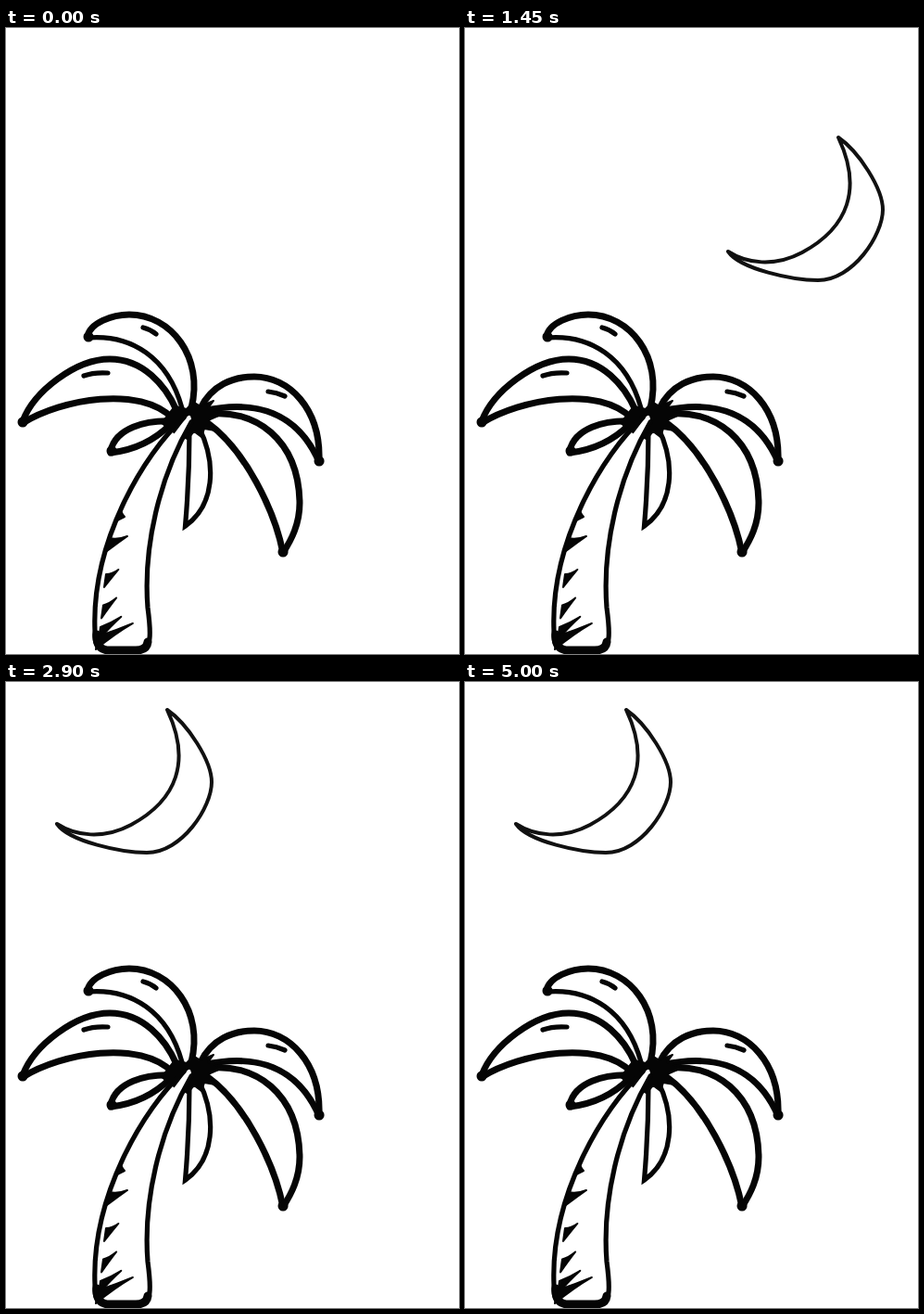
An HTML page that plays this animation: 489x675 px, repeating every 5.05 s.

```html
<!DOCTYPE html>
<html lang="en">
<head>
<meta charset="utf-8">
<title>Palm and moon</title>
<style>
  html, body { margin: 0; width: 100%; height: 100%; overflow: hidden; background: #fff; }
  svg { display: block; width: 100%; height: 100%; }
  path { fill: none; stroke: #050505; stroke-width: 7; stroke-linecap: round; stroke-linejoin: round; }
  .thin { stroke-width: 5.2; }
  .tips { stroke-width: 11; }
  .solid { fill: #050505; stroke-width: 2; }
  .white { fill: #fff; stroke: none; }
  #moon path { stroke-width: 4; stroke: #111; }
  #moon { animation: drift 5050ms infinite; }

  /* The moon glides in slowly, then swings up to its resting place, in 50 ms steps. */
  @keyframes drift {
    0%      { transform: translate(440px, 216px); animation-timing-function: steps(14); }
    13.861% { transform: translate(308px, 137px); animation-timing-function: steps(15); }
    28.713% { transform: translate(229px, 88px);  animation-timing-function: steps(5); }
    33.663% { transform: translate(205px, 74px);  animation-timing-function: steps(10); }
    43.564% { transform: translate(84px, 18px);   animation-timing-function: steps(4); }
    47.525% { transform: translate(38px, 8.5px);  animation-timing-function: cubic-bezier(.2, .6, .5, 1); }
    53.465%, 100% { transform: none; }
  }
</style>
</head>
<body>
<svg viewBox="0 0 489 675">
  <g id="leaves">
    <path d="M88 333C90 318 115 309 133 309C178 309 214 355 200 410"/>
    <path class="thin" d="M88 334C135 330 175 355 190 410"/>
    <path d="M18 424C30 392 75 357 112 357C148 357 172 385 184 412"/>
    <path d="M18 426C60 400 145 385 180 421"/>
    <path d="M113 456C118 432 150 422 182 424"/>
    <path d="M113 458C140 455 160 445 178 427"/>
    <path d="M210 410C222 385 245 376 268 376C305 376 340 410 338 467"/>
    <path d="M338 468C315 415 270 400 213 413"/>
    <path d="M213 417C270 408 316 445 317 512C317 535 308 552 299 566"/>
    <path d="M299 566C290 520 258 455 218 426"/>
    <path class="thin" style="stroke-linejoin:miter" d="M208 430C228 470 225 515 193.500 537Q198 485 198 434"/>
    <path class="tips" d="M18 425h.1M338 467h.1M299 565h.1M114 456h.1M89 333h.1"/>
    <path class="thin" d="M148 323Q156 325 162 330M84 375Q95 371 110 372M283 392Q292 393 301 397"/>
  </g>
  <path class="solid" d="M168 426L182 408 195 411 202 403 210 408 224 402 218 410 234 416 218 423 226 434 214 432 211 441 203 435 196 443 184 438Z"/>
  <g id="trunk">
    <path class="white" d="M194 421Q199 414 200 422L178 466 160 466Z"/>
    <path class="thin" d="M192 420C148 460 92 555 96 650Q95 666 102 668"/>
    <path class="thin" d="M200 425C165 485 148 560 153 625Q157 655 154 663"/>
    <path style="stroke-width:9" d="M98 654Q97 671 112 671H140Q152 671 153 662"/>
    <path class="solid" d="M118 532L124 518Q124 523 128 527Z"/>
  </g>
  <g id="moon">
    <path d="M174 30C196 45 222 85 222 108C222 135 190 184 152 184C125 184 68 172 55 153C75 166 105 170 135 154C185 127 200 85 174 30Z"/>
  </g>
</svg>
<script>
  // Bark: curved wedges that crowd together towards the foot of the trunk.
  const trunk = document.getElementById('trunk');
  for (let i = 0; i < 5; i++) {
    const tipX = 119 + 3.7 * (i - 1.8) ** 2;
    const tipY = 548 + 94 * Math.sin(i * Math.PI / 8);
    const baseX = 111 - 3 * i;
    const baseY = tipY + 8 + 3 * i;
    const midX = (baseX + tipX) / 2;
    const wedge = document.createElementNS('http://www.w3.org/2000/svg', 'path');
    wedge.setAttribute('class', 'solid');
    wedge.setAttribute('d', `M${baseX} ${baseY - 6}Q${midX} ${tipY + 4 + i} ${tipX} ${tipY}
      Q${midX} ${tipY + 7 + i} ${baseX - 2} ${baseY + 8}Z`);
    trunk.append(wedge);
  }
</script>
</body>
</html>
```
